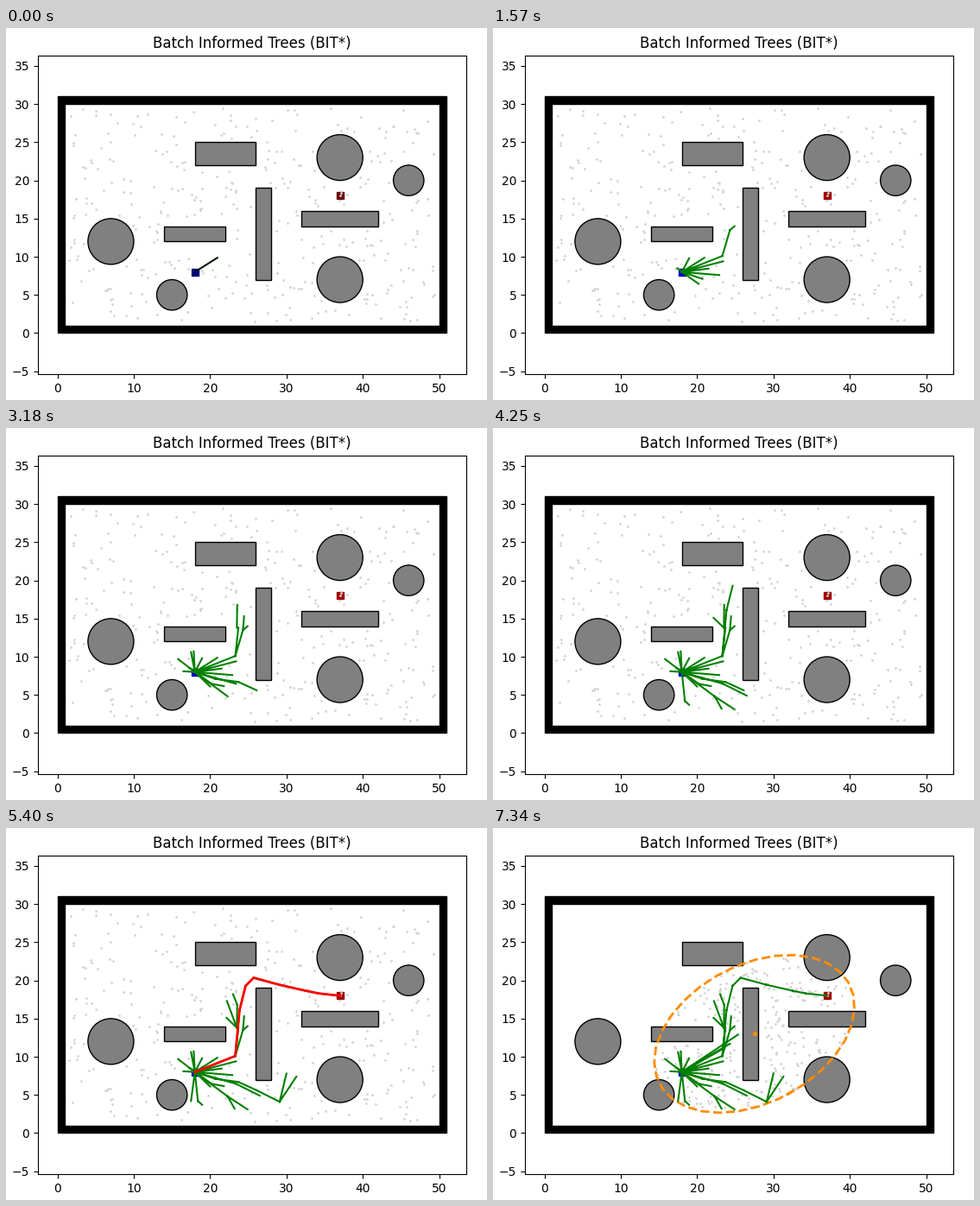
A matplotlib script that plays this animation: 557x431 px, repeating every 8 s.

```python
import math

import numpy as np
import matplotlib.pyplot as plt
from matplotlib.animation import FuncAnimation
from matplotlib.patches import Circle, Rectangle

W, H, DPI = 557, 431, 100
LOOP_MS, STEP_MS = 8000, 20
PATH_MS, RED_MS, ELLIPSE_MS = 5320, 5400, 6320

WALLS = [(0, 0, 1, 30), (0, 30, 50, 1), (1, 0, 50, 1), (50, 1, 1, 30)]
BOXES = [(14, 12, 8, 2), (18, 22, 8, 3), (26, 7, 2, 12), (32, 14, 10, 2)]
DISCS = [(7, 12, 3), (46, 20, 2), (15, 5, 2), (37, 7, 3), (37, 23, 3)]

S, GOAL = (18, 8), (37, 18)
B, D, E = (23.3, 10.1), (24.3, 13.5), (23.5, 13.8)
F, G, K = (20.7, 7.1), (23.85, 16.1), (23.7, 6.7)
P, Q, R = (22.3, 4.8), (26.1, 5.6), (29.1, 4.1)
T, U, V = (18.4, 4.2), (24.65, 19.3), (25.7, 20.35)
ROUTE = [V, (29, 19.45), (32.5, 18.65), (34.2, 18.3), GOAL]

# (time in ms, parent vertex, children joined to it)
GROWTH = [
    (0, S, [(20.95, 9.87)]),
    (550, S, [B, (23.4, 9.4), (21.5, 8.45)]),
    (1060, S, [(22.9, 7.6), (18.95, 9.8), F]),
    (1570, S, [(17.4, 8.5), (20.2, 6.45)]),
    (1570, B, [D]),
    (1570, D, [(24.9, 14)]),
    (2110, S, [(17.5, 10.6), (17.85, 10.7), (20, 6.1), (23.4, 6.45)]),
    (2110, B, [(23.7, 13.8)]),
    (2110, F, [K]),
    (2670, S, [(16.5, 8.1)]),
    (2670, D, [(24.45, 15.3)]),
    (2670, (20.2, 6.45), [(21.8, 6.15)]),
    (3180, S, [(15.8, 9.7), P]),
    (3180, E, [(23.55, 16.8)]),
    (3180, K, [Q]),
    (3740, S, [T]),
    (3740, B, [G]),
    (3740, (23.4, 6.45), [(26.5, 4.9)]),
    (4250, G, [U]),
    (4250, T, [(18.95, 3.7)]),
    (4250, P, [(24.9, 3.1), (23.2, 3.2)]),
    (4250, E, [(22.15, 15.1)]),
    (4760, S, [(17.5, 4.2)]),
    (4760, E, [(22.2, 17.3)]),
    (4760, Q, [R]),
    (4760, R, [(31.3, 7.4)]),
    (PATH_MS, (23.55, 16.8), [(23, 18.2)]),
    (PATH_MS, R, [(30, 7.8)]),
    (PATH_MS, U, [V]),
    *[(PATH_MS, a, [b]) for a, b in zip(ROUTE, ROUTE[1:])],
    (ELLIPSE_MS, S, [(23.5, 11.1)]),
    (6800, S, [(24.3, 11.7)]),
    (7340, S, [(25.35, 12.9)]),
]

CENTER, LONG, SHORT = (27.5, 13), 14.04, 9.05
THETA = math.atan2(10, 19)
MARGIN = 0.5


def is_free(x, y):
    in_box = any(bx - MARGIN <= x <= bx + w + MARGIN and
                 by - MARGIN <= y <= by + h + MARGIN for bx, by, w, h in BOXES)
    in_disc = any(math.hypot(x - cx, y - cy) <= r + MARGIN for cx, cy, r in DISCS)
    inside = 1.5 < x < 49.5 and 1.5 < y < 29.5
    return inside and not in_box and not in_disc


def rotate(along, across):
    c, s = math.cos(THETA), math.sin(THETA)
    return CENTER[0] + along * c + across * s, CENTER[1] + along * s - across * c


def collect(rng, count, draw):
    points = []
    while len(points) < count:
        p = draw(rng)
        if is_free(*p):
            points.append(p)
    return points


def draw_anywhere(rng):
    return rng.uniform(0.5, 49.5), rng.uniform(0.5, 29.5)


def draw_in_ellipse(rng):
    r, a = math.sqrt(rng.uniform()), rng.uniform(0, 2 * math.pi)
    return rotate(LONG * r * math.sin(a), SHORT * r * math.cos(a))


def tree_at(ms):
    xs, ys = [], []
    for start, parent, children in GROWTH:
        if start <= ms:
            for child in children:
                xs += [parent[0], child[0], np.nan]
                ys += [parent[1], child[1], np.nan]
    return xs, ys


rng = np.random.default_rng(7)
near_goal = [GOAL, (37.2, 18.35)]
wide = np.array(collect(rng, 330, draw_anywhere) + near_goal).T
focused = np.array(collect(rng, 265, draw_in_ellipse) + near_goal).T

# The small surplus keeps the pixel size from being rounded down.
fig = plt.figure(figsize=((W + 0.01) / DPI, (H + 0.01) / DPI), dpi=DPI,
                 facecolor="white")
ax = fig.add_axes([37 / W, 29.8 / H, 496 / W, 369.6 / H])
ax.set_title("Batch Informed Trees (BIT*)")
ax.set_xlim(-2.55, 53.55)
half = 56.1 * 369.6 / 496 / 2
ax.set_ylim(15.5 - half, 15.5 + half)
ax.set_xticks(range(0, 51, 10))
ax.set_yticks(range(-5, 36, 5))

for x, y, w, h in WALLS:
    ax.add_patch(Rectangle((x, y), w, h, facecolor="black", edgecolor="black"))
for x, y, w, h in BOXES:
    ax.add_patch(Rectangle((x, y), w, h, facecolor="gray", edgecolor="black"))
for x, y, r in DISCS:
    ax.add_patch(Circle((x, y), r, facecolor="gray", edgecolor="black"))

start_mark, = ax.plot(*S, "s")
goal_mark, = ax.plot(*GOAL, "s")
samples, = ax.plot([], [], ".", color="lightgrey", markersize=2)

t = np.arange(0, 2 * math.pi + 0.2, 0.2)
center_dot, = ax.plot(*CENTER, ".", color="darkorange")
ellipse, = ax.plot(*rotate(LONG * np.sin(t), SHORT * np.cos(t)),
                   "--", color="darkorange", linewidth=2)
tree, = ax.plot([], [], "-")
best, = ax.plot(*zip(S, B, G, U, *ROUTE), "-r", linewidth=2)


def update(frame):
    # Sample mid-frame so changes on odd tens of ms fall in the right frame.
    ms = frame * STEP_MS + STEP_MS / 2
    dark = ms < 40
    start_mark.set_color("#000080" if dark else "#0000c8")
    goal_mark.set_color("#6c0008" if dark else "#a00000")
    tree.set_color("#081808" if dark else "green")
    tree.set_data(*tree_at(ms))
    informed = ms >= ELLIPSE_MS
    samples.set_data(*(focused if informed else wide))
    center_dot.set_visible(informed)
    ellipse.set_visible(informed)
    best.set_visible(RED_MS <= ms < ELLIPSE_MS)
    return start_mark, goal_mark, samples, center_dot, ellipse, tree, best


anim = FuncAnimation(fig, update, frames=LOOP_MS // STEP_MS, interval=STEP_MS,
                     repeat=True, repeat_delay=0, blit=False)
plt.show()
```
